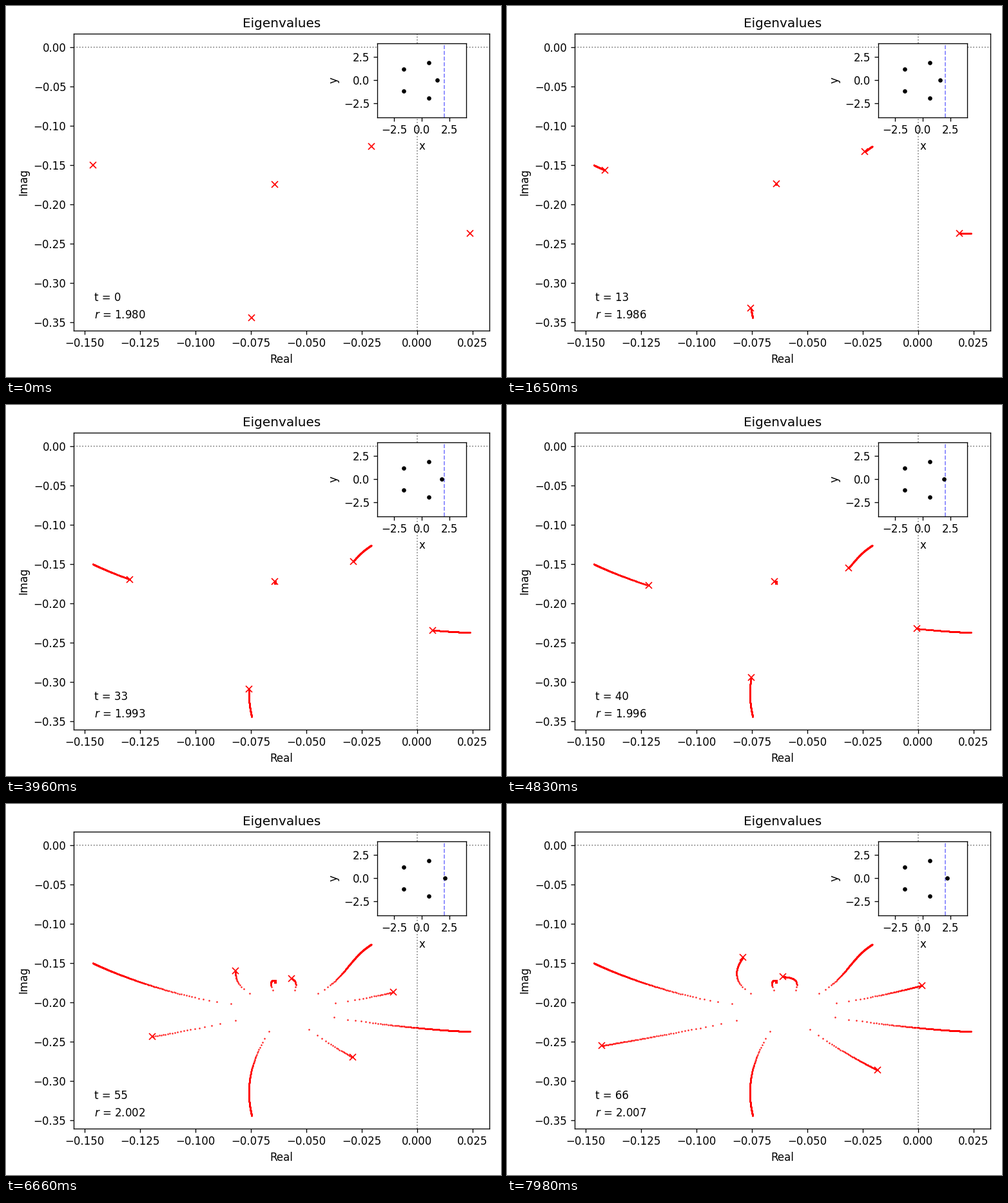
These frames come from a looping animation (768 px wide and 576 px high, 8000 ms). A matplotlib script:

```python
import numpy as np
import matplotlib.pyplot as plt
from matplotlib.animation import FuncAnimation

STEPS = 267      # distinct pictures, one every 30 ms
SWEEP = 399      # steps of the full sweep of r
FRAMES, INTERVAL = 320, 25
CENTRE = -0.0598 - 0.2061j

plt.rcParams["font.family"] = "DejaVu Sans"


def radius(n):
    return 1.98 + 0.04 * n / SWEEP


def eigenvalues(n):
    """Five branches growing as the fifth root of the distance from r = 2."""
    eps = radius(n) - 2
    turn = 2 * np.pi * np.arange(5) / 5 - (np.pi / 5 if eps < 0 else 0)
    z = abs(eps) ** 0.2 * np.exp(1j * turn)
    w = z.conj()
    series = ((1829 + 72j) * z - 132 * w
              + (-441 + 2178j) * z**2 + 52 * z * w + (24 + 300j) * w**2
              + (1218 - 1622j) * z**3 - 396 * w**3
              + 200 * z**4 - 750j * w**4
              + (-1130 + 180j) * z**5 + 10400j * z**7 + 17800 * z**8)
    return CENTRE + 1e-4 * series


path = np.array([eigenvalues(n) for n in range(STEPS)])

fig, ax = plt.subplots(figsize=(6.4, 4.8), dpi=120)
ax.set(title="Eigenvalues", xlabel="Real", ylabel="Imag",
       xlim=(-0.15498, 0.03259), ylim=(-0.3604, 0.0172))
ax.axhline(0, color="gray", ls=":", lw=1)
ax.axvline(0, color="gray", ls=":", lw=1)
trail, = ax.plot([], [], "r.", ms=1)
marks, = ax.plot([], [], "rx", ms=6)
t_text = ax.text(0.05, 0.1, "", transform=ax.transAxes)
r_text = ax.text(0.05, 0.04, "", transform=ax.transAxes)
fig.tight_layout()

inset = fig.add_axes([0.75, 0.7, 0.18, 0.2])
inset.set(xlim=(-4, 4), ylim=(-4, 4), xlabel="x", ylabel="y",
          xticks=[-2.5, 0, 2.5], yticks=[-2.5, 0, 2.5])
inset.axvline(2, color="blue", ls="--", lw=1, alpha=0.5)
ring = 2 * np.exp(2j * np.pi * np.arange(5) / 5)
sites, = inset.plot(ring.real, ring.imag, "ko", ms=3)


def update(i):
    n = (5 * i + 4) // 6
    r = radius(n)
    past, now = path[:n + 1].ravel(), path[n]
    trail.set_data(past.real, past.imag)
    marks.set_data(now.real, now.imag)
    # the shift of the moving site is shown thirty times enlarged
    sites.set_data(np.append(2 + 30 * (r - 2), ring.real[1:]), ring.imag)
    t_text.set_text(f"t = {int(100 * n / SWEEP)}")
    r_text.set_text(f"$r$ = {r:.3f}")
    return trail, marks, sites, t_text, r_text


anim = FuncAnimation(fig, update, frames=FRAMES, interval=INTERVAL,
                     repeat=True, repeat_delay=0, blit=False)
plt.show()
```
